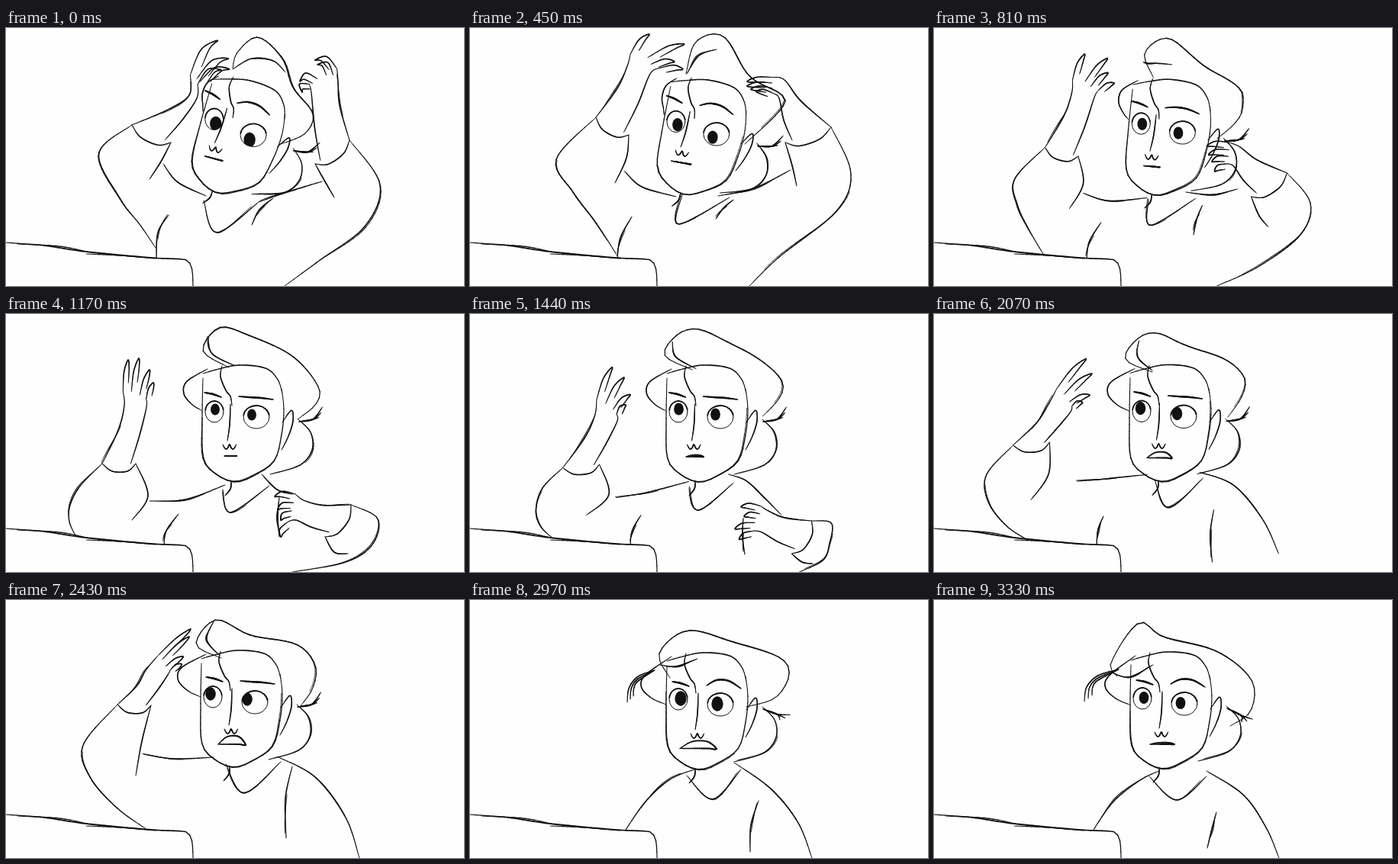
Recreate the animation shown at these times as an HTML page with a canvas. Size 600 by 338 pixels, loop 3480 ms.

```html
<!DOCTYPE html>
<html lang="en">
<head>
<meta charset="utf-8">
<title>Rough pencil animation</title>
<style>
html, body { margin: 0; width: 100%; height: 100%; overflow: hidden; background: #fefefe; }
canvas { display: block; width: 100vw; height: 100vh; }
</style>
</head>
<body>
<canvas id="stage" width="600" height="338"></canvas>
<script>
const ctx = document.getElementById('stage').getContext('2d');
const INK = '#111', PAPER = '#fefefe';
const LOOP = 3480, STEP = 90, LAST = 37, N = 36;
const KEYS = [0, 450, 1170, 1710, 2430, 2970, 3330];

// Head and expression, one value per key
const head = {
  tilt: [15, 10, 0, 0, 0, 0, 0],
  x: [-2, -4, 0, 0, -2, 0, 0],
  y: [1, 1, 0, 0, -1, 2, 1],
  shiftX: [-6, -4, 0, 1, 4, 5, 5],
  shiftY: [-10, -7, 0, 0, -1, 2, 1],
  mouth: [12, 13, 8, 15, 18, 24, 16],
  open: [0, 0, 0, 4, 10, 9, 2],
  gazeX: [2, 2, 1, 0, -3, 3, 2],
  gazeY: [6, 4, -3, -4, -4, -1, -1],
  iris: [9, 8, 7, 8, 8, 9, 7.5],
  arch: [6, 6, 0, 0, 0, 8, 7],
  flare: [0, 0, 0.3, 0.35, 0.4, 0.9, 1]
};

const points = text => text.split(' ').map(s => s.split(',').map(Number));
const poses = text => text.split('|').map(points);

// Contours that change shape from key to key
const contours = {
  hair: '297,53 303,32 330,12 362,40 376,78 402,112 392,138 360,152|283,60 296,18 332,11 366,63 409,88 406,108 360,152|292,70 258,48 280,18 318,28 375,55 409,95 406,118 382,138|290,76 251,58 275,28 300,18 340,40 398,70 409,92 385,130|282,76 249,58 275,26 320,46 380,58 405,85 402,115 385,140|262,102 248,70 285,40 345,55 405,75 418,98 400,128 362,140|240,100 232,82 268,30 300,48 370,67 416,105 415,145 388,165',
  curl: '297,54 322,40 350,43 366,58|284,60 300,36 323,28|265,30 270,52 300,68|265,42 269,60 292,75|272,28 263,52 280,73|249,85 270,87 298,77|229,93 255,101 287,85',
  collar: '259,226 276,268 331,228|278,218 273,257 340,222|284,230 294,260 345,225|291,222 303,255 345,218|288,215 312,253 360,212|284,230 318,261 355,222|282,231 318,262 357,231',
  leftShoulder: '206,178 225,202 262,220|203,188 225,208 270,221|188,245 235,243 287,224|195,236 240,222 286,215|180,202 220,208 272,206|202,304 230,264 262,235 294,222|207,304 235,264 270,236 295,224',
  rightShoulder: '331,228 365,216 414,201|325,220 372,210 420,186|335,210 355,230 375,236|342,210 380,217 415,252 440,290|355,205 405,232 445,285 463,338|346,213 395,248 430,292 448,338|357,224 405,255 435,298 452,338',
  leftCrease: '213,245 199,268 197,303|212,247 197,275 193,302|226,262 210,284 207,302|222,265 215,282 213,302',
  rightCrease: '350,223 332,238 322,258|345,225 332,236 322,250|358,240 356,265 358,292|358,295 358,318 362,338|375,218 366,260 367,312|378,263 368,295 367,330|370,278 364,300 358,325'
};

// Arms per key: cuff (2), wrist (2), fingertips (4), elbow to hip (4), underside (2)
const arms = [{
  keys: poses('165,127 216,150 240,88 250,92 278,16 292,40 293,54 282,55 121,165 150,225 175,257 196,288 203,175 188,198|165,117 208,140 206,50 236,60 235,8 281,21 268,44 279,54 113,172 135,215 165,255 194,300 205,170 190,203|126,196 170,196 155,120 184,122 160,60 174,58 188,73 193,90 98,224 84,250 83,272 92,292 186,238 165,270|117,207 169,198 172,146 202,158 213,79 230,108 232,138 215,148 92,232 89,262 103,285 125,296 178,235 140,257|146,137 190,138 183,92 212,98 242,38 240,48 232,74 230,84 101,190 110,232 145,272 185,301 178,185 170,230'),
  bow: [14, 7, 4, 8, 4], swing: -28
}, {
  keys: poses('450,147 405,178 435,70 400,85 405,42 408,48 385,70 388,84 490,205 470,260 410,305 365,338 415,196 430,222|473,130 413,150 412,68 405,92 363,70 363,76 368,80 375,83 499,190 480,240 405,300 366,338 422,180 428,207|452,250 418,292 390,244 380,270 352,239 356,256 360,270 360,292 487,268 480,302 445,325 375,338 430,312 448,314|443,292 425,336 392,272 385,302 358,266 362,274 334,293 345,298 460,280 462,300 480,320 488,338 440,338 450,340'),
  bow: [-14, -5, -8, -4], swing: 0
}];

const mix = (a, b, k) => a + (b - a) * k;
const mixRow = (a, b, k) => a.map((v, i) => mix(v, b[i], k));

function spline(p) {
  const at = i => p[Math.max(0, Math.min(p.length - 1, i))], out = [];
  for (let i = 0; i < p.length - 1; i++)
    for (let j = 0; j < 10; j++) out.push([0, 1].map(d => {
      const u = j / 10, [a, b, c, e] = [at(i - 1)[d], at(i)[d], at(i + 1)[d], at(i + 2)[d]];
      return b + u * (c - a) / 2 + u * u * (a - 2.5 * b + 2 * c - e / 2) + u ** 3 * (1.5 * (b - c) + (e - a) / 2);
    }));
  out.push(at(p.length));
  return out;
}

// Smooth curve through the points, evenly resampled
function trace(keyPoints) {
  const p = spline(keyPoints), len = [0];
  for (let i = 1; i < p.length; i++) len.push(len[i - 1] + Math.hypot(p[i][0] - p[i - 1][0], p[i][1] - p[i - 1][1]));
  let j = 1;
  return Array.from({ length: N + 1 }, (_, i) => {
    const d = len[len.length - 1] * i / N;
    while (j < p.length - 1 && len[j] < d) j++;
    return mixRow(p[j - 1], p[j], (d - len[j - 1]) / (len[j] - len[j - 1] || 1));
  });
}

// Tapered pencil line
function pencil(p, width = 1.4) {
  for (let i = 1; i < p.length; i++) {
    ctx.lineWidth = width * (0.65 + 0.5 * Math.sin(Math.PI * i / p.length));
    ctx.beginPath();
    ctx.moveTo(...p[i - 1]);
    ctx.lineTo(...p[i]);
    ctx.stroke();
  }
}

// Line with a loose second pass beside part of it
function sketch(p, seed) {
  pencil(p);
  const from = Math.floor(N * (0.2 + 0.2 * Math.sin(seed)));
  pencil(p.slice(from, from + N * 0.6).map(([x, y], i) => {
    const d = 1.5 * Math.sin(i / 7 + seed);
    return [x + d, y + d * 0.6];
  }), 0.9);
}

const curve = (p, width) => pencil(trace(p), width);
const bend = (a, b, bow, u = 0.5) => {
  const [x, y] = mixRow(a, b, u), dx = b[0] - a[0], dy = b[1] - a[1], len = Math.hypot(dx, dy) || 1;
  return [x + dy / len * bow, y - dx / len * bow];
};

const shapes = Object.values(contours).map(text => poses(text).map(trace));
const lid = ['0,281 50,285 105,293 190,301 232,303 240,307 244,318 245,338', '15,283 70,286 110,294', '105,296 150,298 195,302']
  .map(text => trace(points(text)));

function drawContours(seg, k, seed) {
  shapes.forEach((keys, i) => {
    const a = keys[seg], b = keys[seg + 1] || a;
    if (a) sketch(a.map((p, j) => mixRow(p, b[j], k)), i + seed);
  });
}

function drawArm({ keys, bow, swing }, seg, k, seed) {
  const from = keys[seg];
  if (!from) return;
  const to = keys[seg + 1] || from.map(([x, y]) => [x, y + 310]);
  if (!keys[seg + 1]) k = Math.min(1, k * 2);
  const dx = seg === 3 ? swing * Math.sin(Math.PI * k) : 0;
  const p = from.map((q, i) => mixRow(q, to[i], k)).map(([x, y]) => [x + dx, y]);
  const [cuffA, cuffB, wristA, wristB] = p, tips = p.slice(4, 8);
  const arc = mix(bow[seg], bow[seg + 1] ?? bow[seg], k), side = Math.sign(arc);
  const base = tips.map((tip, i) => bend(mixRow(wristA, wristB, i / 3), tip, arc * 0.8, 0.3));

  sketch(trace([cuffA, ...p.slice(8, 12)]), seed);
  curve([cuffB, ...p.slice(12)]);
  curve([cuffA, bend(cuffA, cuffB, -10 * side, 0.3), bend(cuffA, cuffB, -10 * side, 0.75), cuffB]);
  sketch(trace([cuffA, bend(cuffA, wristA, -4 * side, 0.6), wristA, base[0]]), seed + 1);
  curve([mixRow(cuffB, cuffA, 0.15), bend(cuffB, wristB, 2 * side), wristB, base[3]]);
  tips.forEach((tip, i) => curve([base[i], bend(base[i], tip, arc * 0.7, 0.6), tip,
    bend(base[i], tip, arc * 0.5 - 5 * side, 0.75), bend(base[i], tip, -5 * side, 0.3)]));
}

function drawEye([x, y], rx, ry, h, side) {
  const oval = (cx, cy, w, v, from = 0, to = 2 * Math.PI) => {
    ctx.beginPath();
    ctx.ellipse(cx, cy, w, v, 0, from, to);
  };
  ctx.lineWidth = 1;
  oval(x, y, rx, ry);
  ctx.stroke();
  ctx.save();
  ctx.clip();
  oval(x + h.gazeX + side, y + h.gazeY, h.iris * 0.85, h.iris * 1.08);
  ctx.fill();
  ctx.restore();
  ctx.lineWidth = 1.8;
  oval(x, y, rx, ry, 3.3, 6.1);
  ctx.stroke();
}

function drawHead(h, seed) {
  const a = h.tilt * Math.PI / 180, c = Math.cos(a), s = Math.sin(a);
  const place = ([x, y]) => [310 + h.x + (x - 310) * c - (y - 130) * s, 130 + h.y + (x - 310) * s + (y - 130) * c];
  const feature = p => { const [x, y] = place(p); return [x + h.shiftX, y + h.shiftY]; };
  const line = (text, width) => curve(points(text).map(place), width);

  sketch(trace(points('258,84 257,140 259,190 277,211 300,220 322,213 351,193 361,158 364,125 361,98').map(place)), seed);
  line('258,78 275,73 305,67 340,71 356,86 362,104');
  line('283,68 281,82 288,100 294,108 296,120');
  line('361,178 370,160 376,140 374,126 362,142');
  line('295,219 294,229 287,238');
  sketch(trace(points('383,138 399,155 401,178 385,198 346,210').map(place)), seed + 2);

  // Loose hair opens out with flare
  const out = 6 + 50 * Math.min(h.flare, 0.45), drop = 14 * h.flare, loose = Math.max(0, 2 * h.flare - 1);
  curve([[264, 72], [258 - out, 84 + drop], [256 - 1.1 * out, 100 + drop], [258 - 0.7 * out, 114 + drop], [256, 122 + drop]].map(place));
  for (let i = 0; i < 3; i++) {
    const turn = (-32 + 55 * loose + i * 10) * Math.PI / 180, len = 36 - 5 * i;
    curve([[384, 141], [402, 138 + 12 * loose], [384 + len * Math.cos(turn), 141 + len * Math.sin(turn)]].map(place));
    if (loose) curve([[242, 90], [242 - 27 * loose, 98 + 3 * i], [242 - (42 - 4 * i) * loose, 113], [242 - (45 - 5 * i) * loose, 132 - 4 * i]].map(place));
  }

  drawEye(place([273, 128]), 12, 14, h, 0);
  drawEye(place([328, 135]), 17, 15, h, -7);
  curve([[260, 103], [271, 105], [282, 109]].map(feature), 2.1);
  curve([[305, 108], [318, 109 - h.arch], [334, 110 - h.arch], [350, 112]].map(feature), 2.1);
  curve([[294, 118], [293, 145], [290, 166]].map(feature));
  curve(Array.from({ length: 9 }, (_, i) => feature([284 + 2.2 * i, 171 + 6 * Math.abs(Math.sin(i * Math.PI / 4))])));
  const w = h.mouth, o = h.open;
  curve([[-w, o / 2], [-w / 3, -o / 2], [w / 2, -o / 2], [w, o * 0.6], [w / 2, o / 2], [-w, o / 2]]
    .map(([x, y]) => feature([294 + x, 186 + y])), 1.8);
}

function drawLaptop() {
  ctx.fillStyle = PAPER;
  ctx.beginPath();
  lid[0].forEach(q => ctx.lineTo(...q));
  ctx.lineTo(0, 338);
  ctx.fill();
  lid.forEach((p, i) => pencil(p, i ? 1.2 : 1.7));
}

function draw(now) {
  const n = Math.min(LAST, Math.floor(now % LOOP / STEP)), time = n * STEP;
  let seg = 0;
  while (seg < KEYS.length - 2 && time >= KEYS[seg + 1]) seg++;
  const k = (time - KEYS[seg]) / (KEYS[seg + 1] - KEYS[seg]), seed = n * 1.7;
  const h = Object.fromEntries(Object.entries(head).map(([name, v]) => [name, mix(v[seg], v[seg + 1], k)]));
  ctx.fillStyle = PAPER;
  ctx.fillRect(0, 0, 600, 338);
  ctx.strokeStyle = ctx.fillStyle = INK;
  ctx.lineCap = 'round';
  drawContours(seg, k, seed);
  arms.forEach(arm => drawArm(arm, seg, k, seed));
  drawHead(h, seed);
  drawLaptop();
  requestAnimationFrame(draw);
}
requestAnimationFrame(draw);
</script>
</body>
</html>
```
